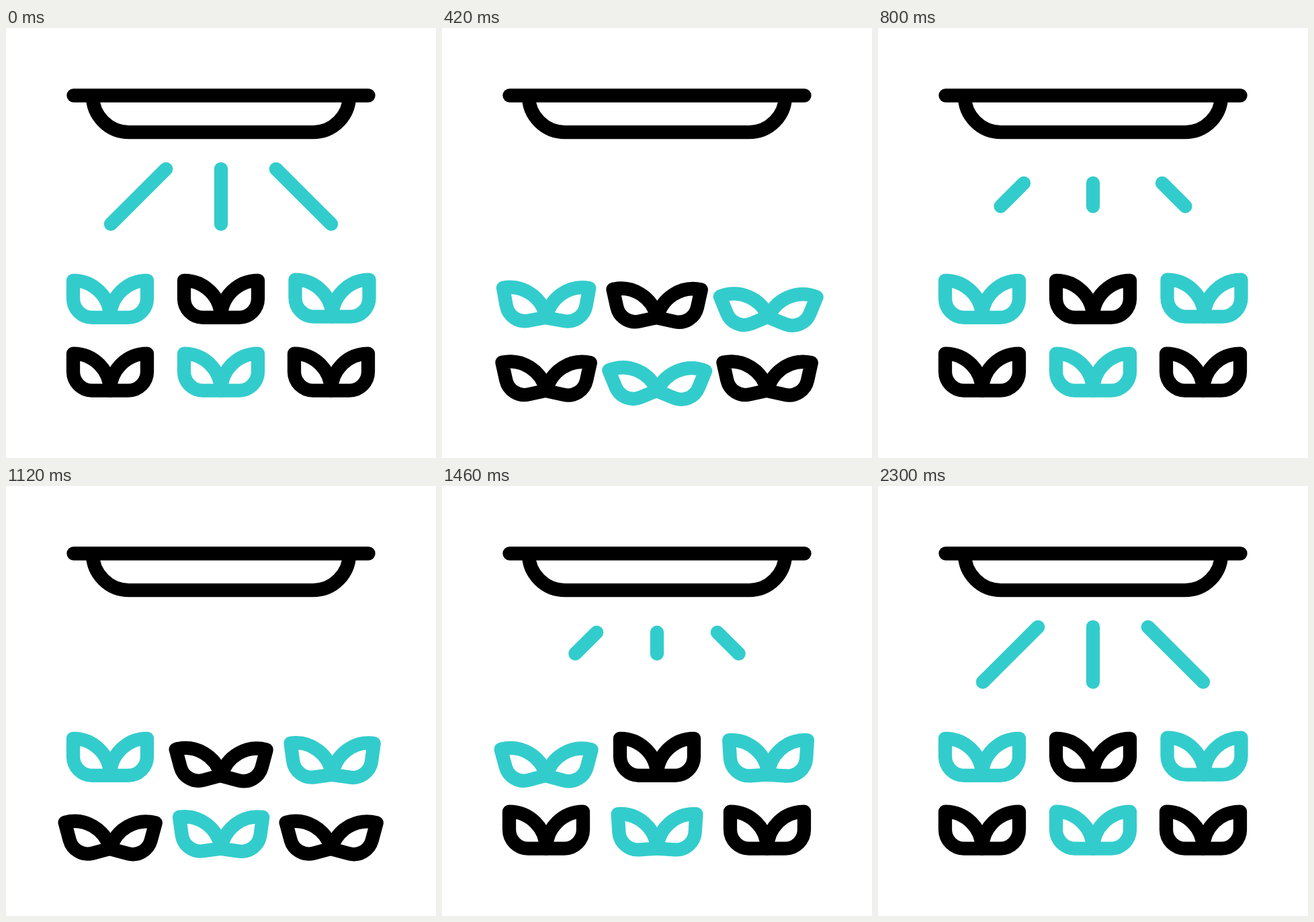
An HTML page that plays this animation: 640 by 640 pixels, repeating every 2.4 s.

```html
<!DOCTYPE html>
<html lang="en">
<head>
<meta charset="utf-8">
<title>Grow light</title>
<style>
  html, body { margin: 0; width: 100%; height: 100%; overflow: hidden; background: #fff; }
  svg { display: block; width: 100vw; height: 100vh; }
  svg * { fill: none; stroke-width: 20.3; stroke-linecap: round; stroke-linejoin: round; }
</style>
</head>
<body>
<svg id="stage" viewBox="0 0 640 640">
  <g stroke="#000">
    <path d="M100.5 100.5H539.5"/>
    <path d="M129 101.1A54 54 0 0 0 183 155.1H457A54 54 0 0 0 511 101.1"/>
  </g>
</svg>
<script>
const LOOP = 2400, STEP = 20;
const CYAN = '#33cccc', BLACK = '#000';
const stage = document.getElementById('stage');

function add(parent, tag, attrs) {
  const el = document.createElementNS('http://www.w3.org/2000/svg', tag);
  for (const key in attrs) el.setAttribute(key, attrs[key]);
  return parent.appendChild(el);
}

// Soft S-curve: part linear, part smoothstep
function ease(x) {
  const s = Math.min(1, Math.max(0, x));
  return 0.6 * s + 0.4 * s * s * (3 - 2 * s);
}

// Light rays: top x and bottom x; the head and tail run down each line
const RAY_TOP = 209.8, RAY_BOTTOM = 291.8, RAY_MS = 380;
const rays = [[238.2, 156], [320, 320], [401.8, 484]].map(([from, to]) =>
  ({ from, to, el: add(stage, 'line', { stroke: CYAN }) }));
const passes = [[-480, 0], [553, 689], [1275, 1410], [1920, 2400]]; // head start, tail start

function drawRays(t) {
  const spans = passes.map(p => p.map(start => ease((t - start) / RAY_MS)));
  const span = spans.find(([head, tail]) => head > tail);
  for (const { from, to, el } of rays) {
    el.style.display = span ? '' : 'none';
    if (!span) continue;
    span.forEach((k, i) => {
      el.setAttribute('x' + (i + 1), from + (to - from) * k);
      el.setAttribute('y' + (i + 1), RAY_TOP + (RAY_BOTTOM - RAY_TOP) * k);
    });
  }
}

// Plants: two mirrored leaves that open about the base.
// The groups open one after another, then again in reverse order.
const LEAF = 'M0 0H-27A28 28 0 0 1 -55 -28V-55A55 55 0 0 1 0 0Z';
const OPEN = 22.2, RISE = 260, FALL = 222;
const peaks = { a: [304, 1382], b: [537, 1211], c: [420, 1282] };
const sides = [{ flip: 1, pivot: '0 0' }, { flip: -1, pivot: '2 1.5' }];
const plants = [
  [155, 430.8, CYAN, 'a'], [320, 430.8, BLACK, 'b'], [485.5, 429.7, CYAN, 'c'],
  [155, 539.6, BLACK, 'b'], [320, 539.6, CYAN, 'c'], [484, 539.6, BLACK, 'b']
].map(([x, y, stroke, group]) => {
  const g = add(stage, 'g', { transform: `translate(${x} ${y})`, stroke });
  return { group, leaves: sides.map(side => ({ ...side, el: add(g, 'path', { d: LEAF }) })) };
});

function angle(group, t) {
  return peaks[group].reduce((sum, peak) =>
    sum + OPEN * ease(1 - (t < peak ? (peak - t) / RISE : (t - peak) / FALL)), 0);
}

function drawPlants(t) {
  for (const { group, leaves } of plants) {
    const turn = -angle(group, t);
    for (const { flip, pivot, el } of leaves)
      el.setAttribute('transform', `scale(${flip} 1) rotate(${turn} ${pivot})`);
  }
}

const begin = performance.now();
function frame() {
  const t = Math.floor(((performance.now() - begin) % LOOP) / STEP) * STEP;
  drawRays(t);
  drawPlants(t);
  requestAnimationFrame(frame);
}
frame();
</script>
</body>
</html>
```
